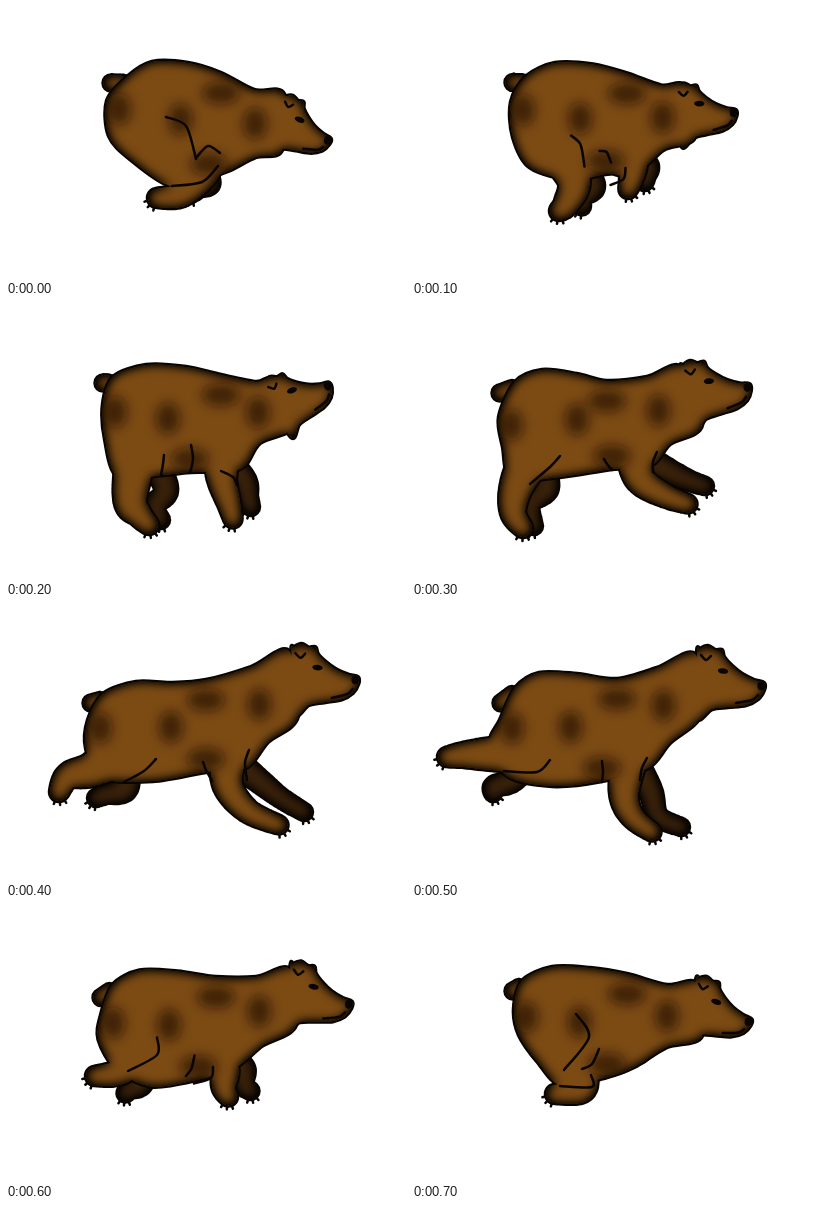
Recreate the animation shown at these times as an HTML page. Size 400 by 273 pixels, loop 0.8 s.

```html
<!DOCTYPE html>
<html lang="en">
<head>
<meta charset="utf-8">
<title>Running bear</title>
<style>
html, body { margin: 0; width: 100%; height: 100%; overflow: hidden; background: #fff; }
svg { display: block; width: 100%; height: 100%; }
.pose { opacity: 0; }
.skin { fill: #7c4b14; }
.far { fill: #3a220b; }
.edge, .line { fill: none; stroke: #080502; stroke-width: 4.5; stroke-linecap: round; stroke-linejoin: round; }
.line { stroke-width: 2.5; }
.fur { filter: url(#rim); }
.shade { fill: #201104; opacity: .66; filter: url(#soft); }
.dot { fill: #080502; }
</style>
</head>
<body>
<svg id="stage" viewBox="0 0 400 273" preserveAspectRatio="none">
  <defs>
    <filter id="soft" filterUnits="userSpaceOnUse" x="0" y="0" width="400" height="273"><feGaussianBlur stdDeviation="6"/></filter>
    <filter id="rim" filterUnits="userSpaceOnUse" x="0" y="0" width="400" height="273" color-interpolation-filters="sRGB">
      <feComponentTransfer in="SourceAlpha"><feFuncA type="table" tableValues="1 0"/></feComponentTransfer>
      <feGaussianBlur stdDeviation="5.5"/>
      <feComponentTransfer><feFuncA type="linear" slope="1.45"/></feComponentTransfer>
      <feComposite operator="in" in2="SourceAlpha" result="dark"/>
      <feMerge><feMergeNode in="SourceGraphic"/><feMergeNode in="dark"/></feMerge>
    </filter>
  </defs>
</svg>
<script>
const STEP = 100;
const stage = document.getElementById('stage');

function add(parent, tag, attrs) {
  const el = document.createElementNS('http://www.w3.org/2000/svg', tag);
  for (const k in attrs) el.setAttribute(k, attrs[k]);
  return parent.appendChild(el);
}

const nums = s => s.split(' ').map(Number);
const pairs = n => n.flatMap((v, i) => i % 2 ? [] : [[v, n[i + 1]]]);
const mid = (a, b) => a.map((v, k) => (v + b[k]) / 2);
const shift = (p, x, y) => [p[0] + x, p[1] + y];

// Torso runs along the back, then from throat to belly and up the rear.
// Limbs are knee, ankle and toe; head is nose x, y, turn and scale.
function pose(torso, tail, head, hind, fore, farHind, farFore, ...folds) {
  return { torso, tail, head, hind, fore, farHind, farFore, folds: folds.join(' ') };
}
function parse(p) {
  return Object.fromEntries(Object.entries(p).map(([k, s]) => [k, nums(s)]));
}
function blend(a, b) {
  return Object.fromEntries(Object.keys(a).map(k => [k, mid(a[k], b[k])]));
}

const tucked = parse(pose(
  '121 71 146 56 182 57 215 67 248 84 278 88 276 144 250 151 222 165 203 171 165 180 124 153 103 130 101 95',
  '105 77', '324 135 15 .85',
  '199 154 178 187 151 192', '225 145 215 150 205 155', '200 172 192 182 185 188', '230 145 225 150 220 152',
  '160 111 180 120 190 153', '190 152 202 140 214 147', '212 160 196 176 166 180'));

const landing = parse(pose(
  '107 70 140 58 180 60 215 68 250 75 268 73 290 118 254 136 234 162 184 165 157 168 112 170 99 132 97 97',
  '97 76', '324 78 -28 .88',
  '124 190 132 206 143 218', '216 172 223 196 227 212', '160 180 148 198 155 213', '238 173 242 190 245 200',
  '158 148 157 157 155 168', '185 138 187 152 184 166', '215 164 227 170 231 178'));

const pushing = parse(pose(
  '103 75 130 63 165 67 195 74 235 70 270 60 290 118 258 137 240 158 200 162 148 170 100 172 91 140 87 110',
  '88 86', '338 80 -12 .95',
  '105 178 101 205 111 221', '228 172 252 188 276 197', '135 180 118 196 122 219', '258 165 278 174 293 179',
  '148 149 138 160 118 177', '192 152 195 157 200 163', '245 145 241 155 241 165'));

const leaping = parse(pose(
  '97 86 130 74 165 75 200 72 245 59 283 43 292 108 262 134 240 160 200 164 147 173 95 170 80 140 82 112',
  '85 95', '352 72 -3 .97',
  '85 162 62 168 53 184', '222 178 242 203 273 217', '120 180 100 186 90 190', '252 172 275 190 298 204',
  '150 151 138 163 118 174', '197 154 200 162 206 173', '243 142 239 155 241 172'));

const reaching = parse(pose(
  '103 80 127 65 165 66 205 71 245 60 283 46 290 105 258 135 236 160 190 173 140 178 95 168 78 135 88 112',
  '89 95', '352 78 0 1',
  '80 146 52 147 35 149', '212 185 220 208 240 224', '100 172 82 178 81 185', '238 182 246 208 269 219',
  '138 152 125 164 92 163', '190 153 191 164 190 174', '235 150 230 160 228 172'));

const gathered = parse(pose(
  '110 72 140 58 178 59 215 65 255 76 285 75 290 127 255 138 222 158 195 168 150 177 125 152 107 126 102 100',
  '101 82', '339 113 10 .92',
  '166 160 170 181 143 185', '225 140 215 148 205 152', '172 172 165 182 158 184', '235 135 228 142 220 145',
  '164 105 177 128 152 161', '187 140 180 155 170 160', '179 166 180 178 148 177'));

const run = [tucked, blend(tucked, landing), landing, pushing, leaping, reaching, blend(reaching, gathered), gathered];

// Head outline around the nose tip
const skull = pairs(nums('-67 -33 -64 -37 -56 -40 -49 -36 -42 -36 -40 -29 -32 -20 -22 -12 -10 -6 0 -3 0 4 -6 13 -18 19 -36 21 -52 23 -67 31'));
const ear = pairs(nums('-63 -31 -58 -26 -53 -30'));
const mouth = pairs(nums('-28 17 -12 14 -6 9'));

const picker = (p, closed) => i => p[closed ? (i + p.length) % p.length : Math.max(0, Math.min(p.length - 1, i))];

function curve(p, closed) {
  const at = picker(p, closed), last = closed ? p.length : p.length - 1;
  let d = 'M' + p[0];
  for (let i = 0; i < last; i++) {
    const [a, b, c, e] = [-1, 0, 1, 2].map(k => at(i + k));
    d += 'C' + b.map((v, k) => v + (c[k] - a[k]) / 6.5) + ' ' + c.map((v, k) => v - (e[k] - b[k]) / 6.5) + ' ' + c;
  }
  return d;
}

// Tapered tube: closely spaced discs along a smooth line
function tube(p, radii) {
  const at = picker(p), n = 18;
  let d = '';
  for (let i = 0; i < p.length - 1; i++) {
    const [a, b, c, e] = [-1, 0, 1, 2].map(k => at(i + k));
    for (let s = 0; s <= n; s++) {
      const t = s / n, r = radii[i] + (radii[i + 1] - radii[i]) * t;
      const [x, y] = b.map((v, k) => v + t * ((c[k] - a[k]) / 2
        + t * (a[k] - 2.5 * v + 2 * c[k] - e[k] / 2 + t * (1.5 * (v - c[k]) + (e[k] - a[k]) / 2))));
      d += `M${(x - r).toFixed(1)} ${y.toFixed(1)}a${r} ${r} 0 1 0 ${2 * r} 0a${r} ${r} 0 1 0 ${-2 * r} 0`;
    }
  }
  return d;
}

function claws(limb, r) {
  const [a, toe] = limb.slice(-2);
  const dir = Math.atan2(toe[1] - a[1], toe[0] - a[0]);
  const side = Math.cos(dir) < 0 ? -1 : 1;
  return [.1, .6, 1.1].map(k => {
    const u = [Math.cos(dir + side * k), Math.sin(dir + side * k)];
    return 'M' + toe.map((v, i) => v + u[i] * r) + 'L' + toe.map((v, i) => v + u[i] * (r + 4));
  }).join('');
}

function layer(parent, shapes, skin) {
  shapes.forEach(d => add(parent, 'path', { class: 'edge', d }));
  const g = add(parent, 'g', { class: 'fur' });
  shapes.forEach(d => add(g, 'path', { class: skin, d }));
}

function drawPose(p, id) {
  const g = add(stage, 'g', { class: 'pose' });
  const line = d => add(g, 'path', { class: 'line', d });
  const torso = pairs(p.torso);
  const hip = shift(torso[13], 36, 33), shoulder = shift(torso[8], -18, -12);

  const [nx, ny, turn, size] = p.head, rad = turn * Math.PI / 180;
  const cos = Math.cos(rad) * size, sin = Math.sin(rad) * size;
  const place = ([x, y]) => [nx + x * cos - y * sin, ny + x * sin + y * cos];

  const limb = (root, joints, radii) => {
    const pts = [root, ...pairs(joints)];
    line(claws(pts, radii[3]));
    return tube(pts, radii);
  };

  const thin = [14, 11, 9, 8];
  layer(g, [limb(hip, p.farHind, thin), limb(shoulder, p.farFore, thin)], 'far');
  layer(g, [tube([shift(torso[0], -3, 6), p.tail], [7, 7.5])], 'skin');

  const near = [
    limb(hip, p.hind, [22, 16, 12, 9]),
    limb(shoulder, p.fore, [18, 14, 11, 8.5]),
    curve(torso, true),
    curve(skull.map(place), true)
  ];
  layer(g, near, 'skin');

  const clip = add(g, 'clipPath', { id: 'body' + id });
  near.forEach(d => add(clip, 'path', { d }));
  const shade = add(add(g, 'g', { 'clip-path': `url(#body${id})` }), 'g', { class: 'shade' });
  const spots = [
    mid(torso[1], torso[9]), shift(torso[3], 0, 20), mid(torso[4], torso[7]),
    shift(torso[9], 0, -13), shift(torso[13], 12, 8)
  ];
  spots.forEach(([cx, cy], i) => add(shade, 'ellipse', { cx, cy, rx: i % 2 ? 19 : 12, ry: i % 2 ? 11 : 16 }));

  const folds = pairs(p.folds);
  for (let i = 0; i < folds.length; i += 3) line(curve(folds.slice(i, i + 3)));
  [ear, mouth].forEach(part => line(curve(part.map(place))));

  const dot = (at, rx, ry, tilt) => add(g, 'ellipse', {
    class: 'dot', rx, ry, transform: `translate(${place(at)}) rotate(${turn + tilt})`
  });
  dot([-41, -15], 5.2, 2.8, 8);
  dot([-3, 0], 3.6, 4.2, 0);
  return g;
}

const total = run.length * STEP, end = 1 / run.length;
run.forEach((p, i) => drawPose(p, i).animate([
  { opacity: 1, offset: 0 }, { opacity: 1, offset: end },
  { opacity: 0, offset: end }, { opacity: 0, offset: 1 }
], { duration: total, delay: i * STEP - total, iterations: Infinity }));
</script>
</body>
</html>
```
